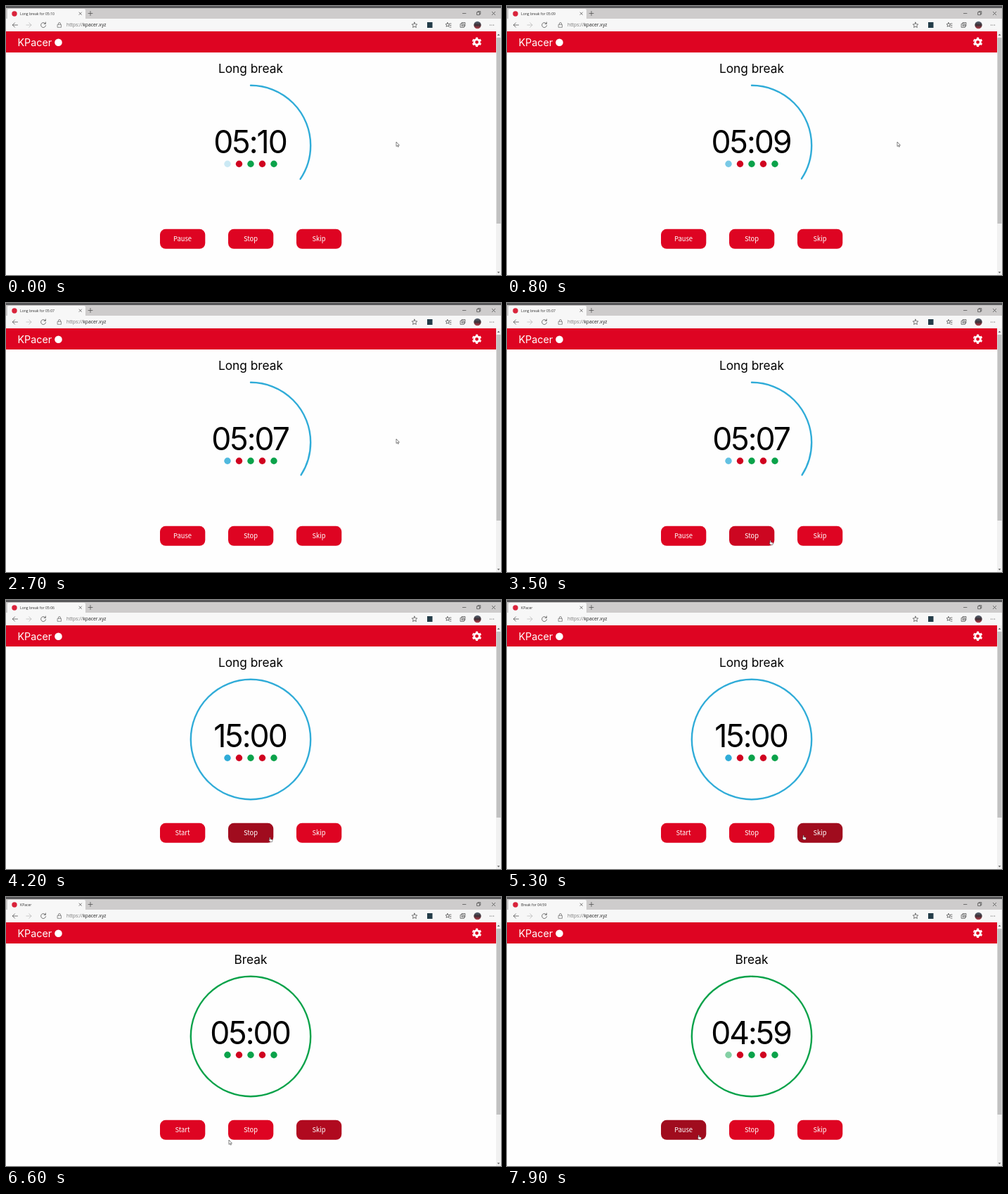
These frames come from a looping animation (704x382 px, 8 s). An HTML page:

```html
<!DOCTYPE html>
<html lang="en">
<head>
<meta charset="utf-8">
<title>KPacer</title>
<style>
  html, body { margin: 0; width: 100%; height: 100%; overflow: hidden; background: #fefefe; }
  svg { display: block; width: 704px; height: 382px; }
  .ui { font-family: "Open Sans", "Noto Sans", sans-serif; }
  .app { font-family: Inter, sans-serif; }
  .mid { text-anchor: middle; }
  .line { fill: none; stroke: #555; stroke-width: .8; stroke-linecap: round; stroke-linejoin: round; }
  .btn { font: 500 9.4px "Noto Sans CJK JP", "Noto Sans CJK", "Noto Sans", sans-serif; fill: #fff; }
</style>
</head>
<body>
<svg viewBox="0 0 704 382">
  <defs>
    <linearGradient id="photo" x2="0" y2="1">
      <stop stop-color="#5b6a78"/><stop offset=".5" stop-color="#3b2d33"/><stop offset="1" stop-color="#b8404c"/>
    </linearGradient>
  </defs>

  <!-- Browser -->
  <rect width="704" height="19" fill="#cecccc"/>
  <rect width="704" height="3" fill="#58585a"/>
  <path d="M2 19V6q0-2 2-2H111q2 0 2 2V19z" fill="#f7f7f7"/>
  <rect y="18" width="704" height="18" fill="#f7f7f7"/>
  <circle cx="12" cy="11" r="3.7" fill="#d9233b"/>
  <text id="tab" class="ui" x="20" y="12.8" font-size="5.1" fill="#333"></text>
  <g class="line">
    <path d="M104 9l3.4 3.4m0-3.4l-3.4 3.4M117 10.5h6m-3-3v6"/>
    <path d="M649.5 10.5h4.5M670 8.8h3.6v3.8H670zM671 8.6v-1h3.8v4h-1M691.3 8.3l4.4 4.4m0-4.4l-4.4 4.4"/>
    <path d="M16.5 27H9.3m3.2-3.2L9.3 27l3.2 3.2"/>
    <path d="M29 27h7m-3.2-3.2L36 27l-3.2 3.2" stroke="#bbb"/>
    <path d="M56 25a3.5 3.5 0 1 0 .6 2.7M56.4 23v2.3h-2.3"/>
    <path d="M73.5 26.3h5v4h-5zM74.5 26v-1a1.5 1.5 0 0 1 3 0v1" stroke="#777"/>
    <path id="star" d="M581 23.2l1.1 2.5 2.7.3-2 1.8.6 2.7-2.4-1.4-2.4 1.4.6-2.7-2-1.8 2.7-.3z"/>
    <path d="M628 23.5l.9 2 2 .2-1.5 1.4.5 2.2-1.9-1.1-1.9 1.1.5-2.2-1.5-1.4 2-.2zM631 25h2m-2 2.5h2m-2 2.5h2"/>
    <path d="M646.5 25.3h5v5h-5zM648 25v-1.5h5v5h-1.2M649 26.5v2.6m-1.3-1.3h2.6"/>
  </g>
  <text class="ui" x="86" y="29.4" font-size="6.8" fill="#777">https://<tspan fill="#222">kpacer.xyz</tspan></text>
  <rect x="599" y="23" width="7.5" height="8" fill="#243d49"/>
  <circle cx="670.5" cy="27" r="5.2" fill="url(#photo)"/>
  <g fill="#444"><circle cx="688.5" cy="27" r=".6"/><circle cx="691" cy="27" r=".6"/><circle cx="693.5" cy="27" r=".6"/></g>

  <!-- Page header and scrollbar -->
  <rect y="36" width="697" height="30" fill="#de0422"/>
  <text class="app" x="16.5" y="56.8" font-size="14.3" fill="#fff">KPacer</text>
  <circle cx="74.5" cy="51.8" r="5.3" fill="#fff"/>
  <g fill="none" stroke="#fff">
    <circle cx="669.6" cy="51.3" r="3.8" stroke-width="2.8"/>
    <circle cx="669.6" cy="51.3" r="5.6" stroke-width="2.4" pathLength="12" stroke-dasharray="1 1" transform="rotate(15 669.6 51.3)"/>
  </g>
  <rect x="697" y="36" width="7" height="346" fill="#f1f1f1"/>
  <rect x="697.5" y="45" width="6" height="264" fill="#c1c1c1"/>
  <path d="M698.6 41.8l1.9-2 1.9 2zM698.6 377.5l1.9 2 1.9-2z" fill="#555"/>

  <!-- Timer -->
  <text id="mode" class="app mid" x="348" y="95.2" font-size="17.3"></text>
  <circle id="ring" cx="348" cy="198" r="85.2" fill="none" stroke-width="2.4" stroke-linecap="round" pathLength="1" transform="rotate(-90 348 198)"/>
  <text id="clock" class="app mid" x="347" y="209.3" font-size="44.5" letter-spacing="-2"></text>
  <g id="dots"></g>
  <g id="buttons"></g>

  <g id="cursor">
    <path id="arrow" d="M0 0V6.4L1.5 5.1 2.5 7.2 3.4 6.8 2.5 4.8H4.4z" fill="#fff" stroke="#333" stroke-width=".6"/>
    <path id="hand" d="M0 .4q.7-.7 1.2 0V2.6L3.8 3.2q.6.2.5 1L3.8 6.5H1L-1 4.1q0-.9 1-.3z" fill="#fff" stroke="#333" stroke-width=".5"/>
  </g>
</svg>
<script>
const $ = id => document.getElementById(id);
const BLUE = '#30acd8', GREEN = '#0aa24a', RED = '#d0021f';
const LOOP = 8000, STOP = 4000, SKIP = 5600, START = 7150;

function add(parent, tag, attrs) {
  const el = document.createElementNS('http://www.w3.org/2000/svg', tag);
  for (const key in attrs) el.setAttribute(key, attrs[key]);
  return parent.appendChild(el);
}

const dots = [BLUE, RED, GREEN, RED, GREEN].map((fill, i) =>
  add($('dots'), 'circle', { cx: 315 + 16.5 * i, cy: 224.3, r: 4.7, fill }));

// Each button is hovered from `enter` to `leave`
const buttons = [
  { x: 219, label: 'Pause', enter: 6950, leave: 9000 },
  { x: 316, label: 'Stop', enter: 3430, leave: 4720 },
  { x: 413, label: 'Skip', enter: 4950, leave: 6530 }
];
for (const b of buttons) {
  b.box = add($('buttons'), 'rect', { x: b.x, y: 316.8, width: 64.3, height: 28, rx: 8 });
  b.text = add($('buttons'), 'text', { x: b.x + 32, y: 334.4, class: 'btn mid' });
  b.text.textContent = b.label;
}

// Cursor stops: time, x, y
const path = [
  [0, 555, 193], [2850, 555, 193], [3500, 374, 337], [4600, 375, 337], [5150, 421, 334],
  [6350, 421, 334], [6500, 400, 349], [6600, 317, 345], [6780, 286, 358], [7050, 272, 338], [LOOP, 272, 338]
];

const clamp = v => Math.max(0, Math.min(1, v));
const mix = (a, b, k) => a + (b - a) * k;
const pad = n => String(n).padStart(2, '0');

function cursorAt(t) {
  const i = path.findIndex(p => p[0] > t);
  const [a, b] = [path[i - 1], path[i]];
  let k = (t - a[0]) / (b[0] - a[0]);
  k = k * k * (3 - 2 * k);
  return [mix(a[1], b[1], k), mix(a[2], b[2], k)];
}

function secondsAt(t) {
  if (t < STOP) return 310 - Math.floor((t + 420) / 1000);
  if (t < SKIP) return 900;
  return t < START ? 300 : 299 - Math.floor((t - START) / 1000);
}

function draw(t) {
  const long = t < SKIP, running = t < STOP || t >= START;
  const mode = long ? 'Long break' : 'Break';
  const color = long ? BLUE : GREEN;
  const left = secondsAt(t);
  const format = s => pad(Math.floor(s / 60)) + ':' + pad(s % 60);

  $('mode').textContent = mode;
  $('clock').textContent = format(left);
  // The tab title trails the page
  $('tab').textContent = t < 4400 ? 'Long break for ' + format(Math.min(left, secondsAt(Math.min(t, STOP - 1))))
    : t < 7450 ? 'KPacer' : 'Break for ' + format(left);

  $('ring').setAttribute('stroke', color);
  $('ring').setAttribute('stroke-dasharray', left / (long ? 900 : 300) + ' 2');

  const phase = (t + (t < STOP ? 375 : LOOP - START + 1000 - LOOP % 1000 + 0)) % 1000 / 1000;
  const blink = t < STOP ? phase : clamp((t - START) / 1000);
  dots[0].setAttribute('fill', color);
  dots[0].setAttribute('opacity', running ? Math.abs(1 - 2 * blink) : 1);

  buttons[0].text.textContent = running ? 'Pause' : 'Start';
  let over = false;
  for (const b of buttons) {
    const k = clamp((t - b.enter) / 250) - clamp((t - b.leave) / 280);
    b.box.setAttribute('fill', `rgb(${mix(222, 160, k)},${mix(4, 12, k)},${mix(34, 30, k)})`);
    over = over || (t >= b.enter && t < b.leave);
  }

  $('cursor').setAttribute('transform', `translate(${cursorAt(t)})`);
  $('arrow').style.display = over ? 'none' : '';
  $('hand').style.display = over ? '' : 'none';
}

function frame() {
  draw(performance.now() % LOOP);
  requestAnimationFrame(frame);
}
frame();
</script>
</body>
</html>
```
